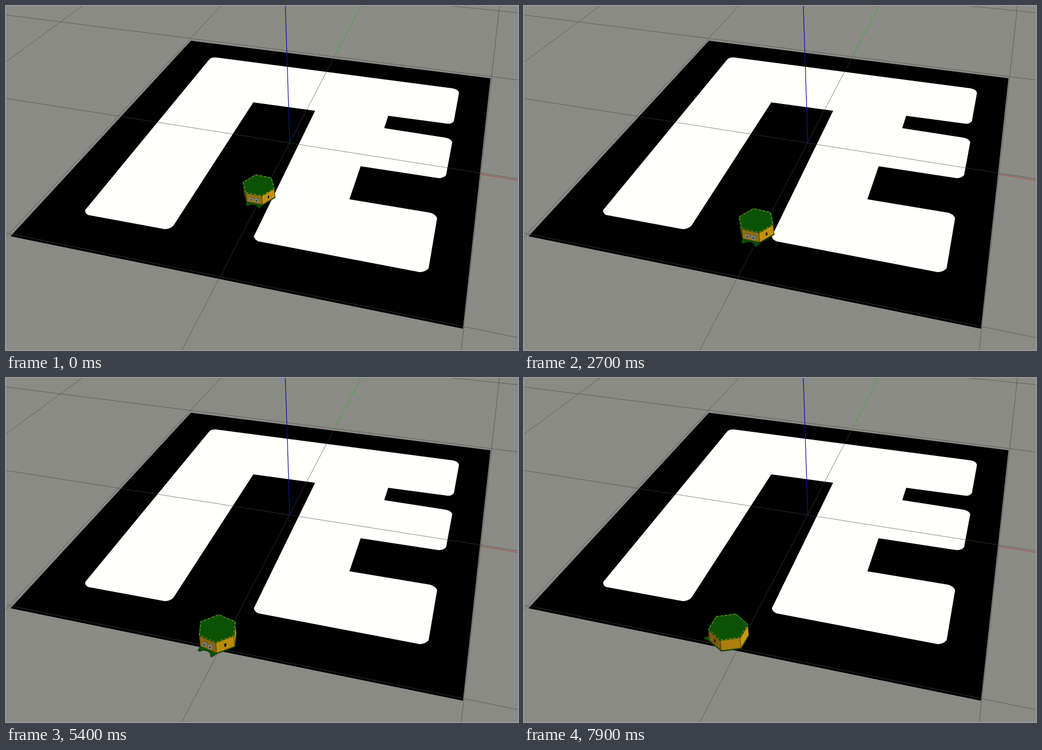
Recreate the animation shown at these times as an HTML page with a canvas. Size 911x614 px, loop 8000 ms.

```html
<!DOCTYPE html>
<html>
<head>
<meta charset="utf-8">
<title>Robot on a track</title>
<style>
  html, body { margin: 0; width: 100%; height: 100%; overflow: hidden; background: #8b8b86; }
  canvas { display: block; }
</style>
</head>
<body>
<canvas id="stage" width="911" height="614"></canvas>
<script>
const ctx = document.getElementById('stage').getContext('2d');
const LOOP = 8000, STEP = 100, RAD = Math.PI / 180;
const GRID = 'rgba(70,70,68,.62)';
const TRACK = new Path2D(`M362 95Q367 91 375 92L795 147Q805 149 806 155L797 205Q794 211 785 210
  L680 196L673 218L782 235Q792 237 794 243L783 302Q778 308 768 307L631 286L611 345L755 369
  Q765 372 767 379L752 468Q746 475 736 475L449 420Q442 417 441 411L550 187L440 172L298 392
  Q291 399 281 398L146 373Q140 370 141 364Z`);

function line(x1, y1, x2, y2, color = GRID, width = 1) {
  ctx.beginPath();
  ctx.moveTo(x1, y1);
  ctx.lineTo(x2, y2);
  ctx.strokeStyle = color;
  ctx.lineWidth = width;
  ctx.stroke();
}

function poly(points, fill, stroke, width = 1) {
  ctx.beginPath();
  points.forEach(p => ctx.lineTo(...p));
  ctx.closePath();
  if (fill) { ctx.fillStyle = fill; ctx.fill(); }
  if (stroke) { ctx.strokeStyle = stroke; ctx.lineWidth = width; ctx.stroke(); }
}

function drawFloor() {
  ctx.fillStyle = '#8b8b86';
  ctx.fillRect(0, 0, 911, 614);
  poly([[329, 62], [862, 129], [813, 576], [8, 411]], '#000');
  ctx.fillStyle = '#fffffc';
  ctx.fill(TRACK);
  line(135, 0, 0, 100);
  line(382, 0, 0, 413);
  line(631, 0, 313, 614);
  line(878, 0, 810, 614);
  line(793, 0, 911, 12);
  line(0, 16, 911, 132);
  line(0, 165, 911, 308.5);
  line(0, 405, 911, 592);
  line(631, 0, 583, 92, '#45b845');
  line(845, 300.5, 911, 311.5, '#b84444');
  line(497, 0, 505, 245, '#1212a8', 1.2);
}

// Drive straight, turn a quarter on the spot, drive on.
function poseAt(t) {
  const run = Math.min(t, 5.08), on = Math.max(0, t - 7.58);
  const turn = Math.min(90, Math.max(0, (t - 5.08) * 36));
  return {
    x: 449.5 - 12.4 * run - 0.41 * run * run - 40 * on,
    y: 320 + 21.4 * run + 0.718 * run * run - 9 * on,
    heading: 106 + 0.59 * run + turn
  };
}

function drawRobot({ x, y, heading }) {
  const rx = 30.2 + (y - 320) * 0.048, ry = 19.8 + (y - 320) * 0.044;

  // angle and radius on the floor plane, depth 0 (lid) to 1 (base)
  const polar = (deg, r, depth) => {
    const c = r * Math.cos(deg * RAD), s = r * Math.sin(deg * RAD);
    return [x + rx * (c + 0.05 * depth) - 0.1 * ry * s, y + ry * s + rx * 0.54 * depth];
  };
  // forward and sideways in robot units, relative to a face direction
  const local = (f, s, depth, dir = heading) =>
    polar(dir + Math.atan2(s, f) / RAD, Math.hypot(f, s), depth);
  const hex = (r, depth) => [30, 90, 150, 210, 270, 330].map(d => polar(heading + d, r, depth));

  poly(hex(0.99, 1.02), '#0a4503', '#0a4a03');

  const bumper = [[0.8, 0.5], [1.13, 0.44], [1.15, 0.32], [0.99, 0.22], [0.93, 0],
    [0.99, -0.22], [1.15, -0.32], [1.17, -0.42], [0.8, -0.5]];
  poly(bumper.map(([f, s]) => local(f, s, 1.02)), '#0c4f05', '#0a4203');

  const faces = [0, 60, 120, 180, 240, 300]
    .map(turn => ({ turn, dir: heading + turn }))
    .sort((a, b) => Math.sin(a.dir * RAD) - Math.sin(b.dir * RAD));

  for (const { turn, dir } of faces) {
    const v = 153 + 50 * Math.cos((dir - 10) * RAD);
    const corner = (side, depth) => polar(dir + side * 30, 0.97, depth);
    poly([corner(-1, 0), corner(1, 0), corner(1, 0.97), corner(-1, 0.97)],
      `rgb(${v},${v * 0.75},12)`, '#3c3a06', 0.7);
    if (Math.sin(dir * RAD) < 0.05) continue;
    if (turn === 300) {
      const slot = [[-0.05, 0.4], [0.05, 0.4], [0.05, 0.68], [-0.05, 0.68]];
      poly(slot.map(([s, d]) => local(0.85, s, d, dir)), '#0a0a08');
    }
    if (turn === 0) drawEyes(local, rx, Math.abs(Math.sin(dir * RAD)));
  }

  poly(hex(1, 0), '#0c5204', '#073d02', 1.2);
  ctx.setLineDash([4.5, 3]);
  poly(hex(0.965, 0), null, '#a8a438', 1);
  ctx.setLineDash([]);
}

function drawEyes(local, rx, facing) {
  for (const side of [0.17, -0.17]) {
    const dot = (f, r, color) => {
      const [x, y] = local(f, side, 0.57);
      ctx.beginPath();
      ctx.ellipse(x, y, r * rx * (0.5 + 0.5 * facing), r * rx, 0, 0, 2 * Math.PI);
      ctx.fillStyle = color;
      ctx.fill();
    };
    dot(0.84, 0.125, '#55524a');
    dot(0.9, 0.12, '#8d8a80');
    dot(0.92, 0.065, '#4c4a45');
  }
}

function frame(now) {
  const t = Math.floor(now % LOOP / STEP) * STEP / 1000;
  drawFloor();
  drawRobot(poseAt(t));
  requestAnimationFrame(frame);
}
requestAnimationFrame(frame);
</script>
</body>
</html>
```
